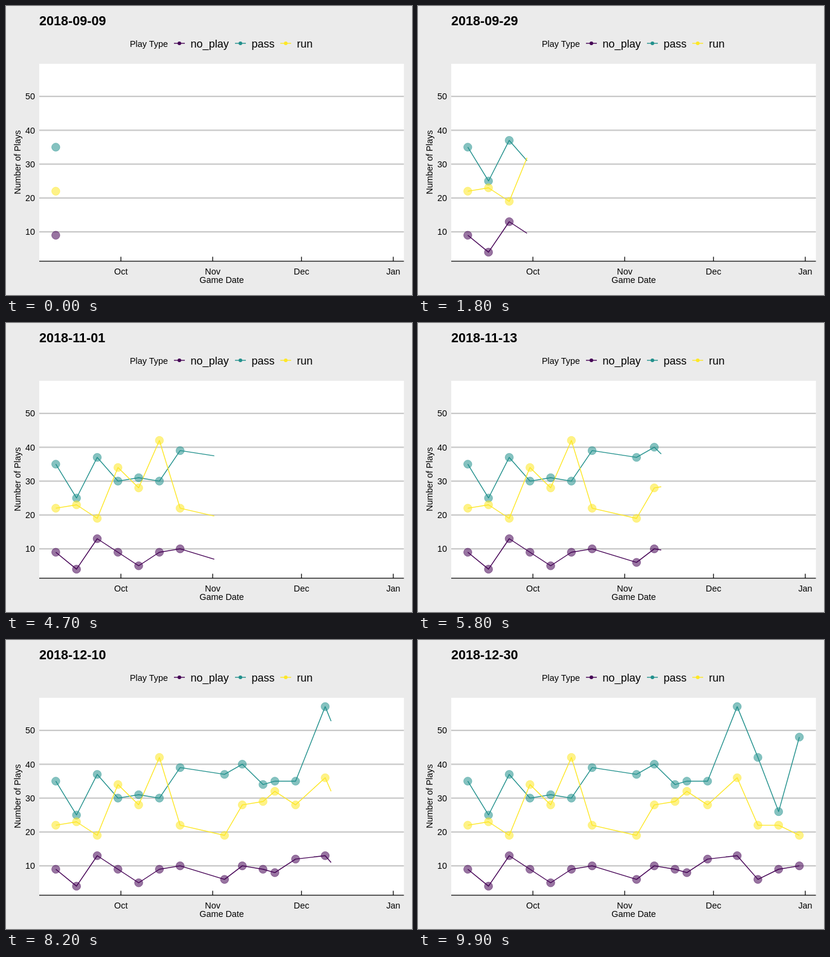
Write an HTML page that moves like this. It is 672 by 480 pixels and loops after 10 s.

```html
<!DOCTYPE html>
<html lang="en">
<head>
<meta charset="utf-8">
<title>Number of plays by game date</title>
<style>
  html, body { margin: 0; width: 100%; height: 100%; overflow: hidden; background: #ebebeb; }
  svg { display: block; font: 14.4px "Liberation Sans", Arial, sans-serif; }
  .title { font-size: 21.6px; font-weight: bold; }
  .label { font-size: 18px; }
  .mid { text-anchor: middle; }
  .end { text-anchor: end; }
  .series { fill: none; stroke-width: 1.4; stroke-linejoin: round; }
  .dot { fill-opacity: .55; stroke-opacity: .55; stroke-width: .8; }
</style>
</head>
<body>
<svg id="chart" width="672" height="480" viewBox="0 0 672 480"></svg>
<script>
const FRAMES = 100, STEP = 100, DAYS = 112;
const START = Date.UTC(2018, 8, 9), DAY_MS = 864e5;
const gameDays = [0, 7, 14, 21, 28, 35, 42, 57, 63, 70, 74, 81, 91, 98, 105, 112];
const gameFrames = gameDays.map(d => Math.round(d * (FRAMES - 1) / DAYS));
const series = [
  { name: 'no_play', color: '#440154', keyX: 287, values: [9, 4, 13, 9, 5, 9, 10, 6, 10, 9, 8, 12, 13, 6, 9, 10] },
  { name: 'pass', color: '#21908c', keyX: 388, values: [35, 25, 37, 30, 31, 30, 39, 37, 40, 34, 35, 35, 57, 42, 26, 48] },
  { name: 'run', color: '#fde725', keyX: 463, values: [22, 23, 19, 34, 28, 42, 22, 19, 28, 29, 32, 28, 36, 22, 22, 19] }
];

const chart = document.getElementById('chart');
const xOf = day => 82.4 + day * 4.9;
const yOf = plays => 431.4 - plays * 5.6275;

function add(tag, attrs, text = '') {
  const el = document.createElementNS('http://www.w3.org/2000/svg', tag);
  for (const key in attrs) el.setAttribute(key, attrs[key]);
  el.textContent = text;
  return chart.appendChild(el);
}
const addText = (x, y, text, cls = '', more = {}) => add('text', { x, y, class: cls, ...more }, text);
const addLine = (x1, y1, x2, y2, stroke, width) =>
  add('line', { x1, y1, x2, y2, stroke, 'stroke-width': width });

// Panel, axes and labels
add('rect', { x: 55, y: 96, width: 603.6, height: 328, fill: '#fff' });
for (let plays = 10; plays <= 50; plays += 10) {
  addLine(55, yOf(plays), 658.6, yOf(plays), '#c8c8c8', 2.3);
  addText(48, yOf(plays) + 5.2, plays, 'end');
}
const title = addText(55, 32, '', 'title');
addText(357, 460, 'Game Date', 'mid');
addText(0, 0, 'Number of Plays', 'mid', { transform: 'translate(24 259.5) rotate(-90)' });

// Legend
addText(205, 68, 'Play Type');
for (const { name, color, keyX } of series) {
  addLine(keyX - 9, 62, keyX + 9, 62, color, 1.4);
  add('circle', { cx: keyX, cy: 62, r: 3, fill: color });
  addText(keyX + 18.6, 69, name, 'label');
}

// Lines lie below the dots
for (const s of series) s.path = add('polyline', { class: 'series', stroke: s.color });
const dots = gameDays.map((day, i) => series.map(s => add('circle', {
  class: 'dot', cx: xOf(day), cy: yOf(s.values[i]), r: 6.8, fill: s.color, stroke: s.color
})));

addLine(55, 423.8, 658.6, 423.8, '#000', 1.3);
[['Oct', 22], ['Nov', 53], ['Dec', 83], ['Jan', 114]].forEach(([month, day]) => {
  addLine(xOf(day), 416.6, xOf(day), 424, '#000', 1.3);
  addText(xOf(day), 446, month, 'mid');
});

function draw(now) {
  const frame = Math.floor(now / STEP) % FRAMES;
  const day = Math.floor(frame * DAYS / (FRAMES - 1));
  title.textContent = new Date(START + day * DAY_MS).toISOString().slice(0, 10);

  const last = gameFrames.findLastIndex(f => f <= frame);
  const next = Math.min(last + 1, gameDays.length - 1);
  const part = (frame - gameFrames[last]) / (gameFrames[next] - gameFrames[last] || 1);
  const mix = list => list[last] + (list[next] - list[last]) * part;

  for (const { values, path } of series) {
    const points = gameDays.slice(0, last + 1).map((d, i) => [xOf(d), yOf(values[i])]);
    if (part > 0) points.push([xOf(mix(gameDays)), yOf(mix(values))]);
    path.setAttribute('points', points.join(' '));
  }
  dots.forEach((group, i) => group.forEach(dot =>
    dot.setAttribute('visibility', i <= last ? 'visible' : 'hidden')));
}

const begin = performance.now();
function tick() {
  draw(performance.now() - begin);
  requestAnimationFrame(tick);
}
tick();
</script>
</body>
</html>
```
